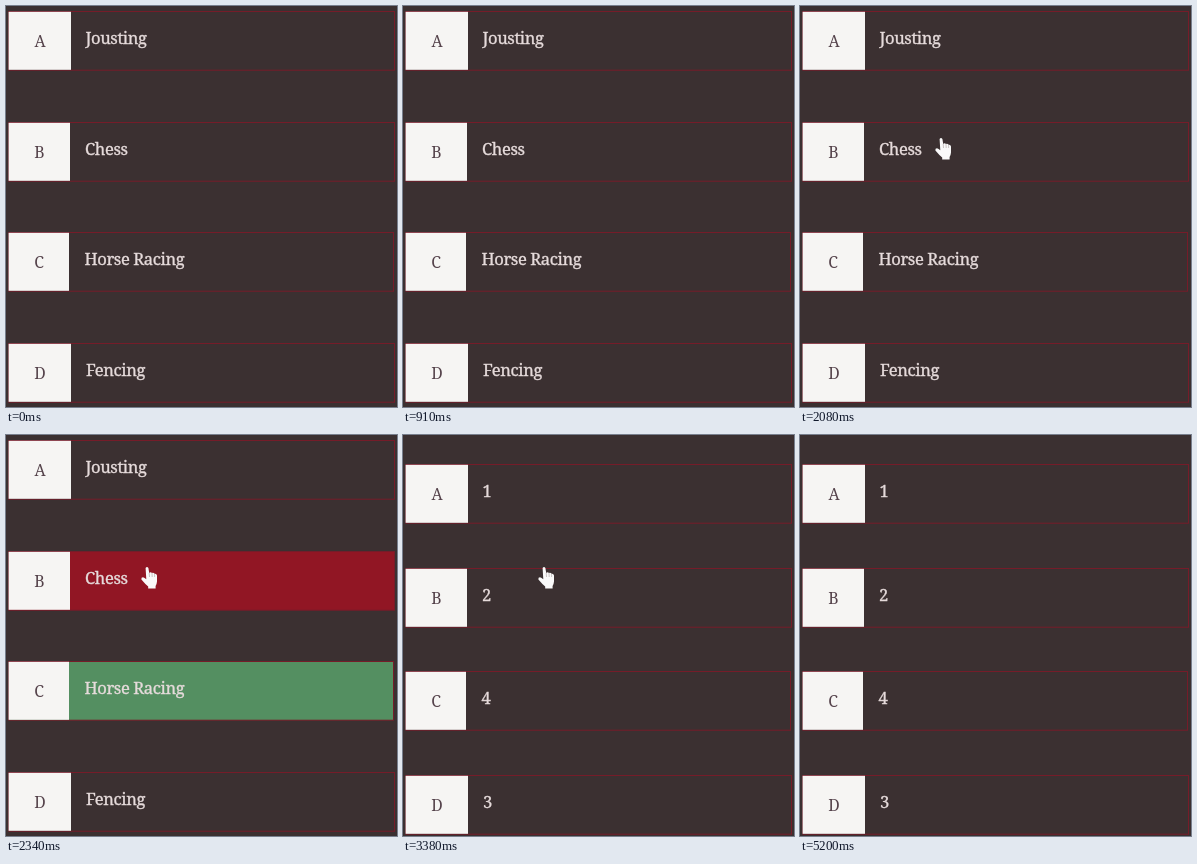
An HTML page that plays this animation: 391 px wide and 401 px high, repeating every 5.33 s.

```html
<!DOCTYPE html>
<html lang="en">
<head>
<meta charset="utf-8">
<title>Quiz</title>
<style>
html, body { margin: 0; width: 100%; height: 100%; overflow: hidden; background: #3b3031; }
svg { display: block; }
text { font: 16.6px "Noto Serif", serif; letter-spacing: -.4px; fill: #e6dbdb; stroke: #e6dbdb; stroke-width: .35; }
.letter { font-size: 15.8px; letter-spacing: 0; fill: #54424a; stroke: none; text-anchor: middle; }
.box { stroke: #751c29; stroke-width: 1; }
</style>
</head>
<body>
<svg width="391" height="401" viewBox="0 0 391 401">
  <g id="rows"></g>
  <g id="hand">
    <path fill="#fafafa" d="M139.6 133Q141 131 142.4 133L143.2 138Q144.6 136.6 146 138Q147.4 137.2 148.6 138.8Q150.6 138.4 151 140.6V146.5Q150.8 149 149.6 151V153.4H142.2V151.4Q139.2 149 135.4 144.4Q135 142.2 137 142.2Q138.6 142.6 140.3 144.3Z"/>
    <path fill="none" stroke="#a89e9e" stroke-width=".6" d="M143.2 138L143.5 142M146 138L146.2 142M148.6 138.8V142"/>
  </g>
</svg>
<script>
const LOOP = 5330, STEP = 130;
const ANSWER = 2340, NEXT = 3380;
const questions = [
  { top: 5.5, pitch: 110.6, answers: ["Jousting", "Chess", "Horse Racing", "Fencing"] },
  { top: 29.5, pitch: 103.6, answers: ["1", "2", "4", "3"] }
];
const edges = [65, 64, 63, 65], textX = [79.5, 79, 78.5, 80];
const rows = document.getElementById("rows"), hand = document.getElementById("hand");
const clamp = v => Math.max(0, Math.min(1, v));

function row(question, answered, i) {
  const y = Math.floor(question.top + i * question.pitch) + .5, edge = edges[i];
  const fill = answered ? ["none", "#911624", "#548f61", "none"][i] : "none";
  const right = i === 2 ? 387.5 : 388.5;
  return `<rect class="box" x="2.8" y="${y}" width="${right - 2.8}" height="58.7" fill="${fill}"/>
    <rect x="2.6" y="${y + .3}" width="${edge - 2.6}" height="58" fill="#f6f5f3"/>
    <text class="letter" x="${(edge + 3) / 2}" y="${y + 35.5}">${"ABCD"[i]}</text>
    <text x="${textX[i]}" y="${y + 32.5}">${question.answers[i]}</text>`;
}

let shown;
function draw(now) {
  const t = Math.floor(now % LOOP / STEP) * STEP;
  const state = t < ANSWER ? 0 : t < NEXT ? 1 : 2;
  if (state !== shown) {
    shown = state;
    const question = questions[state === 2 ? 1 : 0];
    rows.innerHTML = edges.map((_, i) => row(question, state === 1, i)).join("");
  }
  hand.setAttribute("opacity", Math.min(clamp((t - 910) / 520), clamp((4420 - t) / 650)));
  requestAnimationFrame(draw);
}
draw(performance.now());
</script>
</body>
</html>
```
